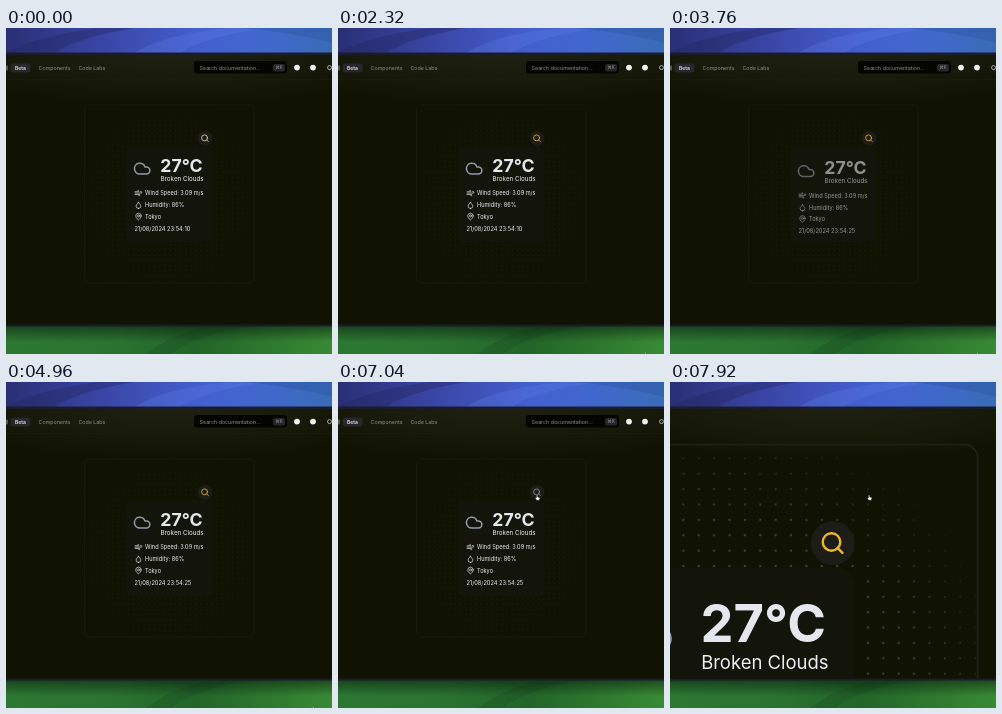
Animation of 326 by 326 pixels, one loop 8000 ms. Source, as an HTML page:

```html
<!DOCTYPE html>
<html lang="en">
<head>
<meta charset="utf-8">
<title>Weather card</title>
<style>
  html, body { margin: 0; width: 100%; height: 100%; overflow: hidden; background: #101202; }
  svg { display: block; width: 100vw; height: 100vh; }
  text { font-family: Inter, sans-serif; white-space: pre; }
  .icon { fill: none; stroke-width: 2; stroke-linecap: round; stroke-linejoin: round; }
  .nav text { font-size: 5.3px; fill: #92928c; }
  #weather text { font-size: 5.6px; fill: #eceef2; }
  #weather .temp { font-size: 17.7px; font-weight: 700; fill: #e4e7ee; }
  #weather .sky { font-size: 6.25px; }
  #weather #date { font-size: 5.7px; }
  #weather .icon { stroke: #e4e6ea; }
  #weather .cloud { stroke: #8f99a9; }
</style>
</head>
<body>
<svg viewBox="0 0 326 326">
  <defs>
    <linearGradient id="blue">
      <stop offset="0" stop-color="#2a2f74"/>
      <stop offset=".3" stop-color="#3a46a6"/>
      <stop offset=".6" stop-color="#4460d0"/>
      <stop offset=".8" stop-color="#4068cc"/>
      <stop offset="1" stop-color="#386cb6"/>
    </linearGradient>
    <linearGradient id="green">
      <stop offset="0" stop-color="#2c7832"/>
      <stop offset=".35" stop-color="#2a7230"/>
      <stop offset=".58" stop-color="#226428"/>
      <stop offset="1" stop-color="#388a34"/>
    </linearGradient>
    <linearGradient id="shade" x2="0" y2="1">
      <stop offset="0" stop-color="#06140a" stop-opacity=".6"/>
      <stop offset="1" stop-color="#06140a" stop-opacity="0"/>
    </linearGradient>
    <radialGradient id="glow">
      <stop offset="0" stop-color="#fff" stop-opacity=".06"/>
      <stop offset=".5" stop-color="#fff" stop-opacity=".035"/>
      <stop offset="1" stop-color="#fff" stop-opacity="0"/>
    </radialGradient>
    <pattern id="dots" width="5.2" height="5.2" x="208.3" y="89.4" patternUnits="userSpaceOnUse">
      <circle cx="2.6" cy="2.6" r=".42" fill="#3f4030"/>
    </pattern>
    <radialGradient id="fade">
      <stop offset=".65" stop-color="#fff"/>
      <stop offset="1" stop-color="#000"/>
    </radialGradient>
    <mask id="dotMask"><rect x="63" y="66" width="200" height="210" fill="url(#fade)"/></mask>
    <clipPath id="window"><rect y="27" width="326" height="269.5"/></clipPath>
  </defs>

  <!-- Wallpaper -->
  <rect width="326" height="30" fill="url(#blue)"/>
  <path d="M0 25Q30 8 92 0H128Q70 10 48 25Z" fill="#23265f" opacity=".4"/>
  <path d="M128 25Q160 5 226 0H262Q200 8 174 25Z" fill="#6280ea" opacity=".25"/>
  <path d="M236 0Q290 5 326 15V0Z" fill="#3058a8" opacity=".5"/>
  <rect y="296" width="326" height="30" fill="url(#green)"/>
  <path d="M165 326Q190 306 250 298H205Q165 306 140 326Z" fill="#0f3c1d" opacity=".2"/>
  <rect y="296" width="326" height="18" fill="url(#shade)"/>

  <!-- Browser window -->
  <rect y="24.5" width="326" height="274" fill="#1a1c2c"/>
  <g clip-path="url(#window)">
    <rect y="25" width="326" height="273" fill="#101202"/>
    <ellipse cx="163" cy="25" rx="260" ry="52" fill="url(#glow)"/>
    <g id="page">
      <g class="nav">
        <path d="M0 51.5H326" stroke="#1d1e14" stroke-width=".5"/>
        <rect x="-3" y="37.500" width="5" height="5" rx="1" fill="#55565a"/>
        <rect x="4.500" y="35.500" width="20" height="9" rx="3" fill="#26272b"/>
        <text x="14.500" y="41.600" text-anchor="middle" style="font-size:5px;font-weight:600;fill:#e6e6ea">Beta</text>
        <text x="32.600" y="41.600">Components</text>
        <text x="72.500" y="41.600">Code Labs</text>
        <rect x="188" y="33" width="93" height="12.500" rx="3" fill="#050500"/>
        <text x="193.600" y="41.500">Search documentation...</text>
        <rect x="267" y="36" width="12" height="7.500" rx="1.800" fill="#25262b"/>
        <text x="273" y="41.400" text-anchor="middle" style="font-size:4.5px">⌘K</text>
        <circle cx="291" cy="39.600" r="2.900" fill="#f2f2f2"/>
        <circle cx="307" cy="39.600" r="2.900" fill="#f2f2f2"/>
        <circle cx="323.500" cy="39.600" r="2" fill="none" stroke="#c8c8c8" stroke-width=".8"/>
      </g>

      <rect x="78.5" y="77" width="169.5" height="178" rx="4.5" fill="none" stroke="#202117" stroke-width=".6"/>
      <rect x="79" y="77.5" width="168.5" height="177" fill="url(#dots)" mask="url(#dotMask)"/>
      <rect x="120" y="118.5" width="86.3" height="96" rx="6" fill="#14150a"/>

      <circle cx="199" cy="110.3" r="7.4" fill="#1d1d17"/>
      <g id="search" class="icon" transform="translate(194.5 105.8) scale(.37)" style="stroke-width:2.2">
        <circle cx="11" cy="11" r="8"/><path d="m21 21-4.3-4.3"/>
      </g>

      <g id="weather">
        <path class="icon cloud" transform="translate(126.9 131.4) scale(.77)"
          d="M17.5 19H9a7 7 0 1 1 6.71-9h1.79a4.5 4.5 0 1 1 0 9Z"/>
        <text class="temp" x="154.300" y="143.600">27°C</text>
        <text class="sky" x="154.500" y="152.700">Broken Clouds</text>
        <path class="icon" transform="translate(128.4 161) scale(.34)"
          d="M17.7 7.7a2.5 2.5 0 1 1 1.8 4.3H2M9.6 4.6A2 2 0 1 1 11 8H2M12.6 19.4A2 2 0 1 0 14 16H2"/>
        <text x="139" y="167.1">Wind Speed: 3.09 m/s</text>
        <path class="icon" transform="translate(128.4 173) scale(.34)"
          d="M12 22a7 7 0 0 0 7-7c0-2-1-3.9-3-5.5S12.5 5 12 2.5c-.5 2.5-2 4.9-4 6.5S5 13 5 15a7 7 0 0 0 7 7Z"/>
        <text x="139" y="179.2">Humidity: 86%</text>
        <g class="icon" transform="translate(128.4 184.5) scale(.34)">
          <path d="M20 10c0 6-8 12-8 12s-8-6-8-12a8 8 0 0 1 16 0Z"/><circle cx="12" cy="10" r="3"/>
        </g>
        <text x="139" y="190.7">Tokyo</text>
        <text id="date" x="128.4" y="202.6"></text>
      </g>
    </g>
  </g>

  <path id="cursor" fill="#fff" stroke="#111" stroke-width=".4"
    d="M-.9-2.2q.7-.7 1.2 0V-.6l1.8.5q.6.3.4 1.100L2 2.700H-.6L-2 .7q0-.9 1.100-.3Z"/>
</svg>
<script>
const LOOP = 8000, STEP = 80;
const ZOOM_CENTER = [217.5, 84.3];
const el = id => document.getElementById(id);
const clamp = v => Math.min(1, Math.max(0, v));
const progress = (t, from, to) => clamp((t - from) / (to - from));
const smooth = p => p * p * (3 - 2 * p);
const mix = (a, b, p) => a + (b - a) * p;
const mixColor = (a, b, p) => `rgb(${a.map((v, i) => Math.round(mix(v, b[i], p)))})`;

const YELLOW = [238, 182, 44], PALE = [230, 218, 172], GREY = [150, 150, 142];

function render(t) {
  // Pinch zoom accelerates towards the end of the loop
  const scale = Math.exp(0.278 * Math.pow(Math.max(0, t - 7600) / 160, 1.964));
  const [zx, zy] = ZOOM_CENTER;
  el('page').setAttribute('transform',
    `translate(${zx} ${zy}) scale(${scale}) translate(${-zx} ${-zy})`);

  // Refreshed data rises and fades in
  const shown = t < 3600 ? 1 : 1 - Math.pow(1 - progress(t, 3600, 4100), 2.3);
  el('weather').setAttribute('opacity', shown);
  el('weather').setAttribute('transform', `translate(0 ${6 * (1 - shown)})`);
  el('date').textContent = '21/08/2024 23:54:' + (t < 3600 ? '10' : '25');

  const hover = progress(t, 6080, 6320) * (1 - progress(t, 7440, 7680));
  el('search').setAttribute('stroke', t < 1000
    ? mixColor(PALE, YELLOW, progress(t, 0, 480))
    : mixColor(YELLOW, GREY, hover));

  const enter = smooth(progress(t, 640, 1200));
  const reach = smooth(progress(t, 5440, 6240));
  const x = mix(307.5, 199.3, reach);
  const y = mix(mix(332, 326.8, enter), 115.5, reach);
  el('cursor').setAttribute('transform', `translate(${x} ${y})`);
}

function tick() {
  const t = performance.now() % LOOP;
  render(Math.floor(t / STEP) * STEP);
  requestAnimationFrame(tick);
}
tick();
</script>
</body>
</html>
```
